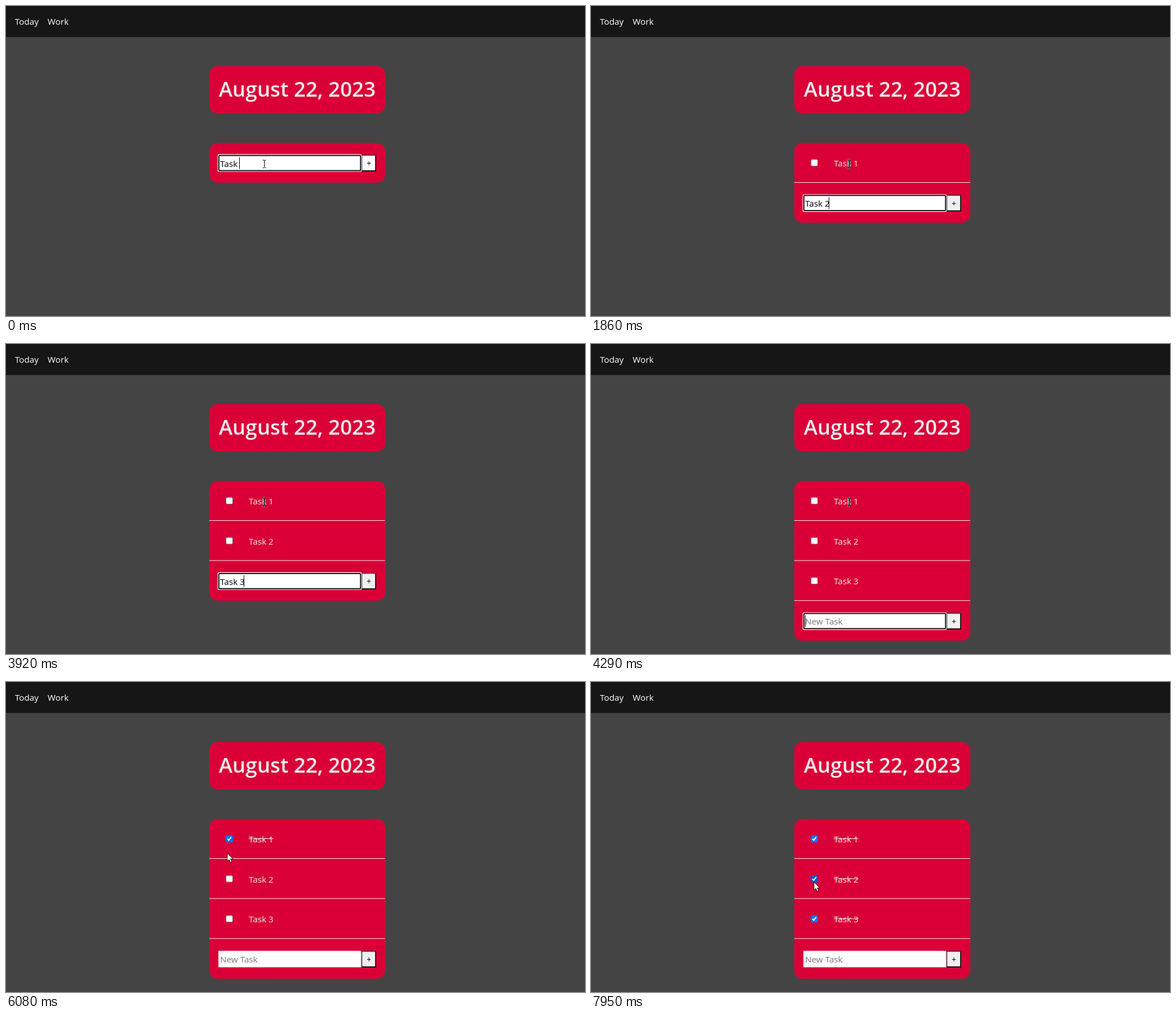
Animation, 1023 px wide and 547 px high, one loop 8000 ms. Source, as an HTML page:

```html
<!DOCTYPE html>
<html lang="en">
<head>
<meta charset="utf-8">
<title>Task list</title>
<style>
  html, body { margin: 0; width: 100%; height: 100%; overflow: hidden; background: #444; }
  svg { display: block; width: 1023px; height: 547px; }
  text { font: 15.2px "Open Sans", "Noto Sans", sans-serif; fill: #ededed; white-space: pre; }
  .nav { fill: #fff; }
  .title { font-size: 36.6px; font-weight: 600; text-anchor: middle; }
  .card { fill: #da0037; }
  .plus { font-size: 14px; text-anchor: middle; fill: #000; }
  .box { fill: #fff; stroke: #767676; }
  .tick { fill: none; stroke: #fff; stroke-width: 2; display: none; }
  .strike { fill: #ededed; display: none; }
  .checked .box { fill: #0075ff; stroke: #0075ff; }
  .checked .tick, .checked .strike { display: inline; }
  .hover .box { stroke: #4f4f4f; }
  .checked.hover .box { fill: #005cc8; stroke: #005cc8; }
</style>
</head>
<body>
<svg viewBox="0 0 1023 547">
  <rect width="1023" height="547" fill="#444"/>
  <rect width="1023" height="54.7" fill="#161616"/>
  <text class="nav" x="15.7" y="33">Today</text>
  <text class="nav" x="73.5" y="33">Work</text>

  <rect class="card" x="359.1" y="106" width="311" height="83.7" rx="15"/>
  <text class="title" x="514.5" y="160">August 22, 2023</text>

  <rect id="list" class="card" x="359.1" y="241.8" width="311" rx="15"/>
  <g id="rows"></g>

  <g id="form">
    <rect x="628" y="262.8" width="26" height="29" fill="#000"/>
    <path d="M628 291.8V262.8H654L652 264.8H630V289.8Z" fill="#4c4c4c"/>
    <rect id="button" x="629.5" y="264.3" width="22.8" height="25.7" fill="#efefef"/>
    <text class="plus" x="641.2" y="283">+</text>
    <rect x="375.3" y="262.6" width="252.2" height="29" fill="#fff"/>
    <g id="ring">
      <rect x="374" y="261.6" width="254.4" height="31" rx="2.5" fill="#fff"/>
      <rect x="376.1" y="263.7" width="250.4" height="26.8" rx="1.5" fill="#fff" stroke="#101010" stroke-width="2"/>
    </g>
    <text id="field" x="378.3" y="283.7"></text>
    <rect id="caret" y="266.7" width="1" height="21"/>
  </g>

  <g id="beam">
    <path id="glow" d="M-3-6.5H3M0-6V6M-3 7H3" fill="none" stroke="#4fb596" stroke-width="4" stroke-dasharray="1.5"/>
    <path d="M-3-6.5H-1L0-5.5L1-6.5H3M0-5.5V6M-3 7H-1L0 6L1 7H3" fill="none" stroke="#000"/>
  </g>
  <path id="arrow" d="M0 0V14.3L3.2 11.3L5.5 16.6L8 15.5L5.7 10.4H10.2Z" fill="#fff" stroke="#000" stroke-width=".9"/>
</svg>
<script>
const LOOP = 8000, PITCH = 70.6;
const $ = id => document.getElementById(id);
const show = (el, on) => { el.style.display = on ? "inline" : "none"; };

// Each track holds [start in ms, value...]; a value stays until the next one.
const typing = [
  [0, "Task "], [150, "Task 1"], [430, ""],
  [1010, "T"], [1290, "Ta"], [1410, "Tas"], [1530, "Task"], [1680, "Task "], [1830, "Task 2"], [1980, ""],
  [2660, "T"], [2780, "Ta"], [2900, "Tas"], [3210, "Task"], [3770, "Task "], [3920, "Task 3"], [4290, ""]
];
const added = [430, 1980, 4290];
const ticked = [5810, 6470, 7130];
const blur = 5690, caretOff = [4880, 5420];
const pointer = [
  [0, 456.5, 278.5], [5000, 446, 278], [5120, 432, 278], [5270, 414, 277], [5420, 399, 276], [5570, 390, 275.5],
  [5960, 390, 278], [6080, 391, 302], [6210, 392, 332], [6340, 393, 347], [6600, 393, 350],
  [6740, 393, 360.5], [6860, 393, 388], [6980, 393, 411], [7280, 393, 419.5],
  [7560, 393, 410], [7690, 393, 390], [7820, 393.5, 366], [7950, 394, 353]
];

const at = (track, t) => track.reduce((now, key) => key[0] <= t ? key : now);
const move = (el, x, y) => el.setAttribute("transform", `translate(${x} ${y})`);

$("rows").innerHTML = added.map((_, i) => `
  <g transform="translate(0 ${PITCH * i})">
    <rect class="box" x="388.8" y="270.8" width="11.6" height="11.6" rx="2"/>
    <path class="tick" d="M391.3 276.8L393.6 279.2L398 273.4"/>
    <text x="429" y="283">Task ${i + 1}</text>
    <rect class="strike" x="429" y="276" width="43.5" height="1"/>
    <rect x="359.1" y="311" width="311" height="1" fill="#ededed"/>
  </g>`).join("");
const rows = [...$("rows").children];

function render(t) {
  const count = added.filter(start => start <= t).length;
  const [, x, y] = at(pointer, t);
  const isBeam = x > 428;
  const value = at(typing, t)[1];

  $("list").setAttribute("height", 70 + PITCH * count);
  rows.forEach((row, i) => {
    const over = Math.abs(x - 394.5) < 7 && Math.abs(y - 276.5 - PITCH * i) < 7;
    show(row, i < count);
    row.classList.toggle("checked", t >= ticked[i]);
    row.classList.toggle("hover", over);
  });

  move($("form"), 0, PITCH * count);
  $("button").setAttribute("fill", count ? "#efefef" : "#fdfdfd");
  show($("ring"), t < blur);
  const field = $("field");
  field.textContent = value || "New Task";
  field.style.fill = value ? "#000" : "#757575";
  $("caret").setAttribute("x", value ? Math.floor(377.3 + field.getComputedTextLength()) : 378.3);
  show($("caret"), t < blur && !(t >= caretOff[0] && t < caretOff[1]));

  show($("beam"), isBeam);
  show($("glow"), t >= 580);
  show($("arrow"), !isBeam);
  move($(isBeam ? "beam" : "arrow"), x, y);
}

const start = performance.now();
function tick() {
  render((performance.now() - start) % LOOP);
  requestAnimationFrame(tick);
}
tick();
</script>
</body>
</html>
```
